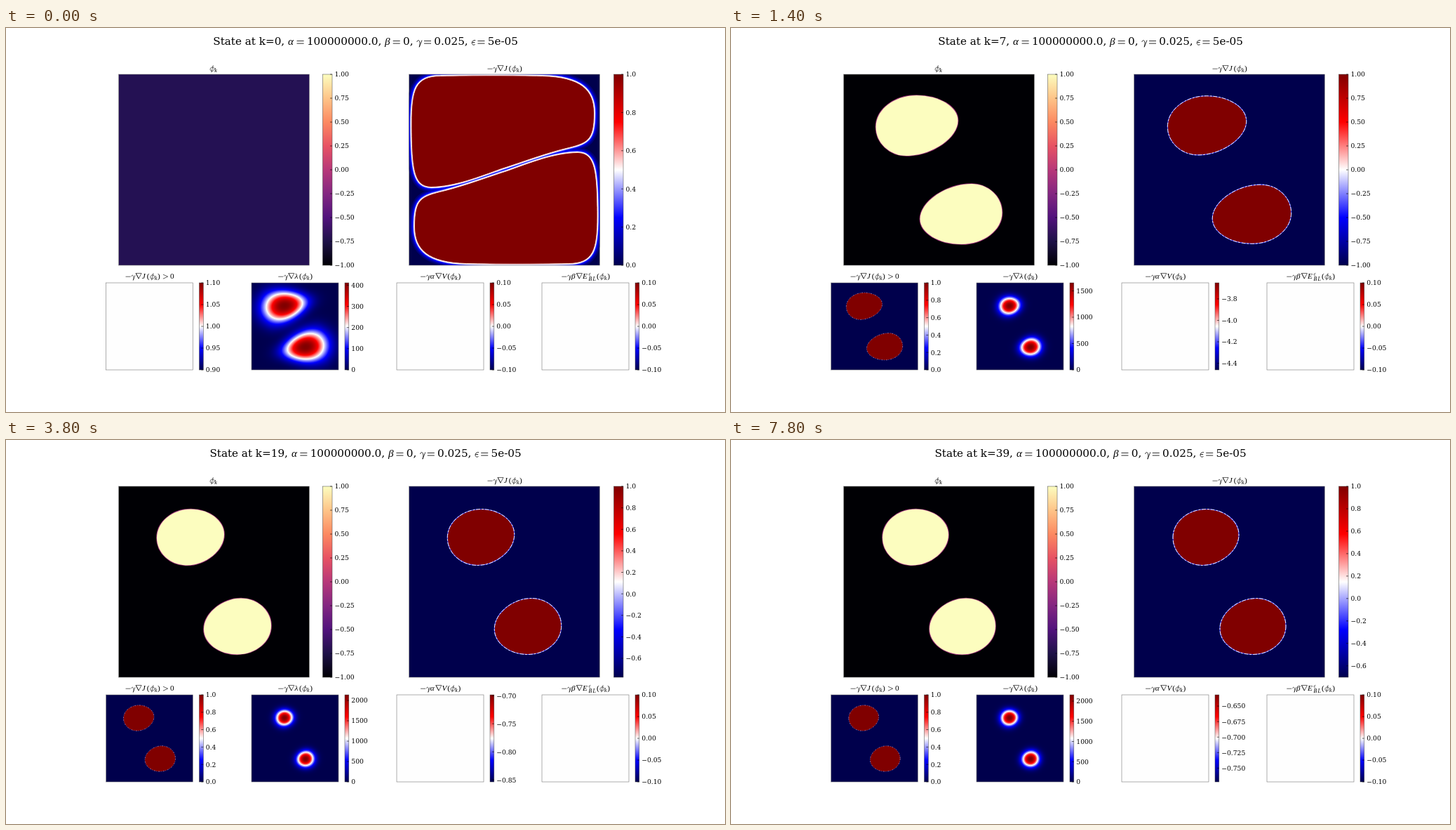
Animation of 1025x547 px, one loop 8 s. Source, as an HTML page with a canvas:

```html
<!DOCTYPE html>
<html lang="en">
<head>
<meta charset="utf-8">
<title>Phase field iteration</title>
<style>
html, body { margin: 0; width: 100%; height: 100%; overflow: hidden; background: #fff; }
canvas { position: absolute; left: 350px; top: 363px; width: 124px; height: 124px; }
#stage { position: absolute; left: 0; top: 0; width: 1025px; height: 547px; }
text { font-family: "DejaVu Serif", "Noto Serif", serif; white-space: pre; }
.m { font-family: "Liberation Serif", serif; font-style: italic; }
.up { font-style: normal; }
</style>
</head>
<body>
<canvas id="lam" width="124" height="124"></canvas>
<svg id="stage" viewBox="0 0 1025 547"></svg>
<script>
const STEP = 200, COUNT = 40;
const stage = document.getElementById('stage');
const ctx = document.getElementById('lam').getContext('2d');

const NAVY = '#00004c', MAROON = '#800000', CREAM = '#fcfdbf';
const SEISMIC = [[0, 0, 76], [0, 0, 255], [255, 255, 255], [255, 0, 0], [128, 0, 0]];
const MAGMA = ['#000004', '#1d1147', '#51127c', '#832681', '#b73779', '#e75263', '#fc8961', '#fec488', CREAM];

// k, then the left, top, right and bottom extremes of the upper blob
const SHAPES = [
  [2, 20, 80, 110, 11, 215, 57, 66, 141],
  [3, 32, 79, 108, 22, 188.5, 62, 82, 126],
  [4, 37.5, 78, 108, 25.5, 177.5, 64, 84, 122.5],
  [7, 46, 75, 104, 30, 163, 66, 89.5, 116],
  [11, 51, 74, 103.5, 32, 155.5, 68, 94.5, 113],
  [19, 54.5, 73.5, 103, 32.5, 150.5, 68.5, 97.5, 112.5],
  [28, 55.5, 73, 103, 32.5, 149.5, 69, 97.5, 112.5]
];
// k, volume term, peak of lambda term, half width, half height, taper
const STATS = [
  [0, 0, 411, 26, 17.5, .2],
  [1, -25, 470, 24, 17, .18],
  [2, -17, 800, 18, 14, .13],
  [3, -12.28, 1042, 15.6, 12.2, .08],
  [7, -4.056, 1653, 12.4, 10.4, .05],
  [11, -1.851, 1979, 11, 9.7, .04],
  [19, -.776, 2138, 10.4, 9.4, .03],
  [28, -.705, 2156, 10.3, 9.4, .03],
  [30, -.702, 2156, 10.3, 9.4, .03]
];
const FIRST = 'M3.5 70C3.5 22 9 2.5 45 2.5C90 1.5 150 1.5 190 2.5C245 4 264 22 264 55' +
  'C264 95 255 98 222 106C190 114 150 129 132 134.5C100 146 65 160 32 160.5C8 160 3.5 140 3.5 70Z';

// Values settle geometrically between table rows
function at(table, k) {
  const last = table[table.length - 1];
  if (k >= last[0]) return last.slice(1);
  const i = table.findIndex(r => r[0] > k), a = table[i - 1], b = table[i], q = .75;
  const f = (1 - q ** (k - a[0])) / (1 - q ** (b[0] - a[0]));
  return a.slice(1).map((v, j) => v + (b[j + 1] - v) * f);
}

function blob(k) {
  if (k < 2) return FIRST;
  const p = at(SHAPES, k), low = .52 - .2 / k;
  const arc = (x0, y0, x1, y1, upright, h) => upright
    ? `C${x0} ${y0 + (y1 - y0) * h} ${x1 + (x0 - x1) * h} ${y1} ${x1} ${y1}`
    : `C${x0 + (x1 - x0) * h} ${y0} ${x1} ${y1 + (y0 - y1) * h} ${x1} ${y1}`;
  const [lx, ly, tx, ty, rx, ry, bx, by] = p;
  return `M${lx} ${ly}` + arc(lx, ly, tx, ty, true, .55) + arc(tx, ty, rx, ry, false, .55) +
    arc(rx, ry, bx, by, true, low) + arc(bx, by, lx, ly, false, .55) + 'Z';
}

function pair(d, attrs) {
  const p = `<path d="${d}"/>`;
  return `<g ${attrs}>${p}<g transform="rotate(180 136 136)">${p}</g></g>`;
}
const ring = (d, color, w, more = '') => pair(d, `fill="none" stroke="${color}" stroke-width="${w}" ${more}`);
const solid = (d, color) => pair(d, `fill="${color}"`);

function panel(x, y, size, fill, inner = '') {
  return `<svg x="${x}" y="${y}" width="${size}" height="${size}" viewBox="0 0 272 272">` +
    `<rect width="272" height="272" fill="${fill}"/>${inner}</svg>` +
    `<rect x="${x}" y="${y}" width="${size}" height="${size}" fill="none" stroke="#777" stroke-width=".6"/>`;
}

function label(s, x, y, size, cls = '') {
  return `<text x="${x}" y="${y}" font-size="${size}" class="${cls}">${s}</text>`;
}

// Colour bar with automatic tick spacing
function bar(x, y, w, h, lo, hi, map = 'seismic') {
  const raw = (hi - lo) / (h > 200 ? 9 : 6), mag = 10 ** Math.floor(Math.log10(raw));
  const step = mag * [1, 2, 2.5, 5, 10].find(s => s * mag >= raw - 1e-9);
  let digits = 0;
  while (Math.abs(step * 10 ** digits - Math.round(step * 10 ** digits)) > 1e-6) digits++;
  let out = `<rect x="${x}" y="${y}" width="${w}" height="${h}" fill="url(#${map})" stroke="#444" stroke-width=".5"/>`;
  for (let i = Math.ceil(lo / step - 1e-6); i * step <= hi + step * 1e-6; i++) {
    const ty = y + h - (i * step - lo) / (hi - lo) * h;
    out += `<path d="M${x + w - 3} ${ty}h3" stroke="#000" stroke-width=".6"/>` +
      label((i * step).toFixed(digits).replace('-', '\u2212'), x + w + 3.5, ty + 3.4, 9.2);
  }
  return out;
}

// Math glyphs: advance widths in em, and outlines for the drawn ones
const WIDTH = { '−': .778, '=': .778, 'γ': .518, '∇': .833, J: .63, '(': .389, ')': .389, 'ϕ': .596, '>': 1.2,
  0: .5, 'λ': .583, 'α': .64, 'β': .58, V: .68, E: .76, k: .521, B: .76, L: .68, 'ϵ': .406 };
const DRAWN = {
  '−': 'M.08-.25H.7',
  '=': 'M.06-.367H.72M.06-.133H.72',
  '>': 'M.3-.52L.9-.25L.3.02',
  'γ': 'M.03-.27C.08-.46 .22-.48 .28-.3C.33-.15 .33 .02 .25.21M.5-.43C.45-.22 .3-.02 .25.21',
  '∇': 'M.06-.67H.78L.42.02ZM.1-.66L.44-.02',
  'ϕ': 'M.42-.69L.2.2M.05-.17C.05-.52 .56-.55 .56-.25C.56 .1 .05 .12 .05-.17Z',
  'ϵ': 'M.38-.42C.13-.46 .05-.3 .05-.17C.06 .04 .24 .03 .34-.03M.06-.23H.32'
};

function glyph(c, x, y, size) {
  if (!DRAWN[c]) return label(c, x, y, size, /[()0]/.test(c) ? 'm up' : 'm');
  return `<path transform="translate(${x} ${y}) scale(${size})" d="${DRAWN[c]}" fill="none" stroke="#000" stroke-width=".055"/>`;
}

// "_" lowers the next sign, "^" raises it without advancing
function math(s, mid, y, size = 11.3) {
  let x = 0, mode = '', out = '';
  for (const c of s) {
    if (c === '_' || c === '^') { mode = c; continue; }
    const f = mode ? .7 : 1, dy = mode === '_' ? (s.includes('^') && c !== 'k' ? .25 : .15) : mode ? -.38 : 0;
    out += glyph(c, x, y + dy * size, size * f);
    if (mode !== '^') x += WIDTH[c] * size * f;
    mode = '';
  }
  return `<g transform="translate(${mid - x / 2} 0)">${out}</g>`;
}

function heading(k) {
  const size = 15.2, y = 24;
  let x = k > 9 ? 290.4 : 295.3, out = '';
  const say = (s, em) => { out += label(s, x, y, size); x += em * size; };
  const sym = c => {
    out += glyph(c, x, y, size) + glyph('=', x + (WIDTH[c] + .12) * size, y, size);
    x += (WIDTH[c] + 1.125) * size;
  };
  say(`State at k=${k},`, k > 9 ? 7.663 : 7.027);
  sym('α'); say('100000000.0,', 7.314);
  sym('β'); say('0,', 1.272);
  sym('γ'); say('0.025,', 3.498);
  sym('ϵ'); say('5e-05', 2.838);
  return out;
}

const gradient = (id, stops) => `<linearGradient id="${id}" x1="0" y1="1" x2="0" y2="0">` +
  stops.map((c, i) => `<stop offset="${i / (stops.length - 1)}" stop-color="${c}"/>`).join('') + '</linearGradient>';
const DEFS = `<defs>${gradient('seismic', SEISMIC.map(c => `rgb(${c})`))}${gradient('magma', MAGMA)}</defs>`;
const TITLES = math('ϕ_k', 296, 61) + math('−γ∇J(ϕ_k)', 711, 61) + math('−γ∇J(ϕ_k)>0', 204.7, 357) +
  math('−γ∇λ(ϕ_k)', 412.5, 357) + math('−γα∇V(ϕ_k)', 619.5, 357) + math('−γβ∇E^ϵ_B_L(ϕ_k)', 826.5, 357);

function phiPanel(k) {
  const d = blob(k);
  if (k === 0) return panel(160.5, 66, 272, '#241153');
  const edge = k === 1
    ? ring(d, '#51127c', 5) + ring(d, '#b73779', 3) + ring(d, '#fc8961', 1.4)
    : ring(d, '#a0307d', 1.7);
  return panel(160.5, 66, 272, k === 1 ? '#241153' : '#000004', edge + solid(d, CREAM));
}

function stepPanel(k) {
  const d = blob(k + 1);
  const edge = k === 0
    ? [['#000078', 15], ['#0000aa', 11], ['#0000e0', 8], ['#1010ff', 6], ['#8080ff', 4], ['#fff', 2.8]]
      .map(([c, w]) => ring(d, c, w)).join('') + solid(d, MAROON) + ring(d, '#ffd8d8', .9)
    : solid(d, MAROON) + ring(d, '#4a4aff', 1.1) + ring(d, '#fff', .9, 'stroke-dasharray="6 2 3 1.5"');
  return panel(574.5, 66, 272, NAVY, edge);
}

function signPanel(k) {
  const d = blob(k + 1);
  return k === 0 ? panel(142.5, 363, 124, '#fefefe') : panel(142.5, 363, 124, NAVY,
    solid(d, MAROON) + ring(d, '#c8b8ff', 1.1, 'stroke-dasharray="5 4 2 3"'));
}

function seismic(v) {
  const p = Math.min(3.9999, Math.max(0, v * 4)), i = Math.floor(p), f = p - i;
  return SEISMIC[i].map((a, j) => a + (SEISMIC[i + 1][j] - a) * f);
}

function drawLambda(hw, hh, taper) {
  const img = ctx.createImageData(124, 124), cos = Math.cos(.2), sin = Math.sin(.2);
  const bump = (dx, dy) => {
    const u = (dx * cos - dy * sin) / hw, v = (dx * sin + dy * cos) / hh;
    const narrow = 1 - taper * Math.max(-1, Math.min(1.6, u));
    return Math.exp(-Math.LN2 * (u * u + (v / narrow) ** 2) ** 1.15);
  };
  for (let y = 0, n = 0; y < 124; y++) {
    for (let x = 0; x < 124; x++, n += 4) {
      const a = x + .5 - 47, b = y + .5 - 32.7, c = 77 - x - .5, e = 91.3 - y - .5;
      img.data.set([...seismic(bump(a, b) + bump(c, e)), 255], n);
    }
  }
  ctx.putImageData(img, 0, 0);
}

function draw(k) {
  const [vol, peak, hw, hh, taper] = at(STATS, k);
  const pad = Math.abs(vol) * .1 || .1;
  drawLambda(hw, hh, taper);
  stage.innerHTML = DEFS + heading(k) + TITLES +
    phiPanel(k) + bar(451.5, 66, 13.5, 272, -1, 1, 'magma') +
    stepPanel(k) + bar(866.5, 66, 13.5, 272, k ? Math.max(-1, vol) : 0, 1) +
    signPanel(k) + bar(275.5, 363, 5.8, 124, k ? 0 : .9, k ? 1 : 1.1) +
    '<rect x="350" y="363" width="124" height="124" fill="none" stroke="#777" stroke-width=".6"/>' +
    bar(483, 363, 5.8, 124, 0, peak) +
    panel(557, 363, 124, '#fefefe') + bar(690, 363, 5.8, 124, vol - pad, vol + pad) +
    panel(764, 363, 124, '#fefefe') + bar(897, 363, 5.8, 124, -.1, .1);
}

const start = performance.now();
let shown = -1;
function tick() {
  const k = Math.floor((performance.now() - start) / STEP) % COUNT;
  if (k !== shown) draw(shown = k);
  requestAnimationFrame(tick);
}
tick();
</script>
</body>
</html>
```
